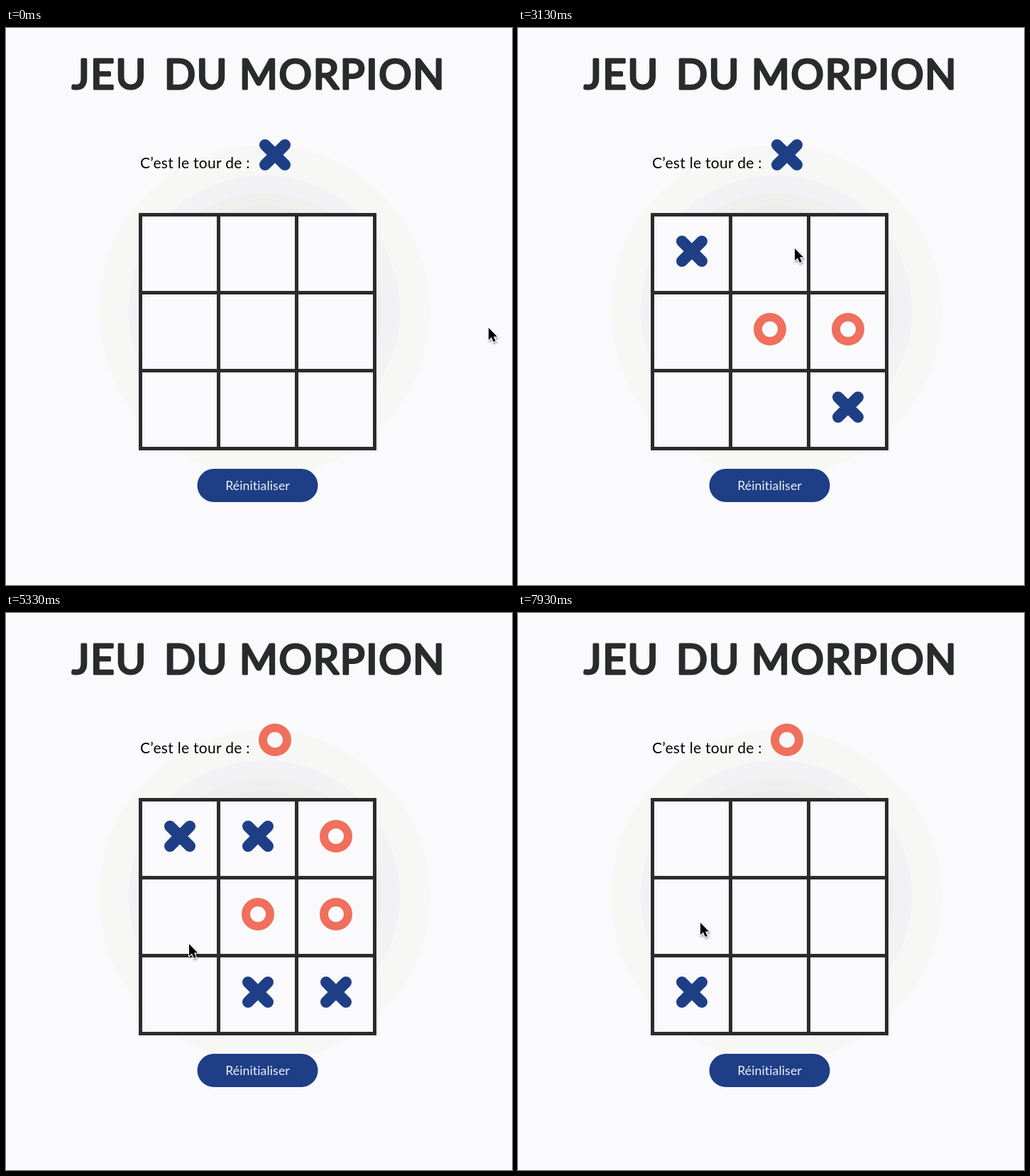
An HTML page that plays this animation: 713x786 px, repeating every 8000 ms.

```html
<!DOCTYPE html>
<html lang="fr">
<head>
<meta charset="utf-8">
<title>Jeu du morpion</title>
<style>
  html, body { margin: 0; width: 100%; height: 100%; overflow: hidden; background: #fafafc; }
  svg { display: block; width: 100%; height: 100%; }
  text { font-family: Lato, sans-serif; }
  .title { font-size: 58px; letter-spacing: 1.7px; fill: #2a2b2b; stroke: #2a2b2b; stroke-width: 3.2; stroke-linejoin: round; }
  .turn { font-size: 21px; letter-spacing: .3px; }
  .label { font-size: 17.7px; letter-spacing: .1px; fill: #f0f3fa; text-anchor: middle; }
  .win { font-size: 33px; font-weight: 700; letter-spacing: 1.5px; text-anchor: middle; }
  .cross { fill: none; stroke: #1e3e86; stroke-width: 16; stroke-linecap: round; }
  .ring { fill: none; stroke: #f06f5d; stroke-width: 12; }
  .grid { fill: none; stroke: #2a2b2b; stroke-width: 5; }
</style>
</head>
<body>
<svg viewBox="0 0 713 786">
  <defs>
    <path id="X" class="cross" d="M-14 -14 14 14M14 -14-14 14"/>
    <circle id="O" class="ring" r="17"/>
    <filter id="shadow" x="-50%" y="-50%" width="200%" height="200%">
      <feDropShadow dx="1" dy="2" stdDeviation="1.4" flood-opacity=".4"/>
    </filter>
  </defs>
  <rect width="713" height="786" fill="#fafafc"/>
  <g transform="translate(364 399)">
    <circle r="234" fill="#f7f7f5"/>
    <circle r="191" fill="#f2f2f4"/>
    <circle r="166" fill="#efefee"/>
    <circle r="148" fill="#ececec"/>
  </g>
  <text class="title" y="86"><tspan x="93">JEU</tspan><tspan x="223">DU</tspan><tspan x="329">MORPION</tspan></text>
  <text class="turn" x="189" y="198">C’est le tour de :</text>
  <use id="turn" x="379" y="179"/>
  <rect x="189.5" y="263.5" width="330" height="330" fill="#fafafc"/>
  <path class="grid" d="M189.5 263.5h330v330h-330zM299.5 263.5v330M409.5 263.5v330M189.5 373.5h330M189.5 483.5h330"/>
  <g id="marks"></g>
  <text id="win" class="win" x="355.5" y="653.5"></text>
  <g id="button">
    <rect id="pill" x="269.5" y="622" width="170" height="47" rx="23.5"/>
    <text class="label" x="354.5" y="652">Réinitialiser</text>
    <rect id="focus" x="269" y="622" width="171" height="47.6" rx="3" fill="none" stroke="#3080d6" stroke-width="2.2"/>
  </g>
  <g id="cursor" filter="url(#shadow)">
    <path d="M0 0V17.2L4 13.5 6.8 20 9.8 18.7 7 12.4H12.2Z" fill="#050505" stroke="#fff" stroke-width="2" stroke-linejoin="round" paint-order="stroke"/>
  </g>
</svg>
<script>
const LOOP = 8000, STEP = 1000 / 15;
const CELL = 110, LEFT = 189.5, TOP = 263.5, BUTTON_TOP = 622;
const TRAVEL = 470, PAUSE = 200, REACTION = 70;
const $ = id => document.getElementById(id);
const show = (node, on) => node.setAttribute('visibility', on ? 'visible' : 'hidden');

// Each click is [time, x, y]; what it does follows from where it lands.
const clicks = [
  [0, 680, 423], [730, 269, 292], [1800, 360, 434], [2400, 440, 519], [2800, 447, 434],
  [3330, 390, 311], [4060, 436, 323], [4860, 343, 541], [5460, 258, 467],
  [6800, 322, 702], [7200, 318, 610], [7530, 280, 578], [8130, 257, 437]
];
const resetTime = clicks.find(([, , y]) => y > BUTTON_TOP)[0];

const cells = Array.from({ length: 9 }, (_, i) => {
  const node = document.createElementNS('http://www.w3.org/2000/svg', 'use');
  node.setAttribute('x', 245 + CELL * (i % 3));
  node.setAttribute('y', 315 + CELL * Math.floor(i / 3));
  return $('marks').appendChild(node);
});

function hasWon(board, player) {
  const three = [0, 1, 2];
  const line = (from, step) => three.every(k => board[from + step * k] === player);
  return three.some(i => line(3 * i, 1) || line(i, 3)) || line(0, 4) || line(2, 2);
}

function play(t) {
  let game = { board: [], player: 'X', winner: '' };
  for (const [time, x, y] of clicks) {
    if (time > t) break;
    if (y > BUTTON_TOP) game = { board: [], player: 'X', winner: '' };
    const col = Math.floor((x - LEFT) / CELL), row = Math.floor((y - TOP) / CELL);
    if (col > 2 || row > 2) continue;
    game.board[3 * row + col] = game.player;
    if (hasWon(game.board, game.player)) game.winner = game.player;
    game.player = game.player === 'X' ? 'O' : 'X';
  }
  return game;
}

// The pointer travels late, then rests for a moment before clicking.
function pointerAt(t) {
  const i = clicks.findIndex(([time]) => time > t);
  const [t0, x0, y0] = clicks[i - 1], [t1, x1, y1] = clicks[i];
  const arrive = t1 - PAUSE, leave = Math.max(t0 + REACTION, arrive - TRAVEL);
  const p = Math.min(1, Math.max(0, (t - leave) / (arrive - leave)));
  const eased = p * p * (3 - 2 * p);
  return [x0 + (x1 - x0) * eased, y0 + (y1 - y0) * eased];
}

function draw(now) {
  const t = Math.round(Math.floor((now % LOOP + 8) / STEP) * STEP) % LOOP;
  const { board, player, winner } = play(t);
  cells.forEach((node, i) => {
    show(node, board[i]);
    if (board[i]) node.setAttribute('href', '#' + board[i]);
  });
  $('turn').setAttribute('href', '#' + player);
  $('win').textContent = winner && `${winner} a gagné !`;
  $('button').setAttribute('transform', `translate(0 ${winner ? 65.5 : 0})`);

  const sinceReset = t - resetTime;
  $('pill').setAttribute('fill', sinceReset > -150 && sinceReset < 260 ? '#4b649e' : '#1e3e86');
  show($('focus'), sinceReset > -REACTION && sinceReset < 525);
  $('cursor').setAttribute('transform', `translate(${pointerAt(t)})`);
}

const start = performance.now();
function tick() {
  draw(performance.now() - start);
  requestAnimationFrame(tick);
}
tick();
</script>
</body>
</html>
```
